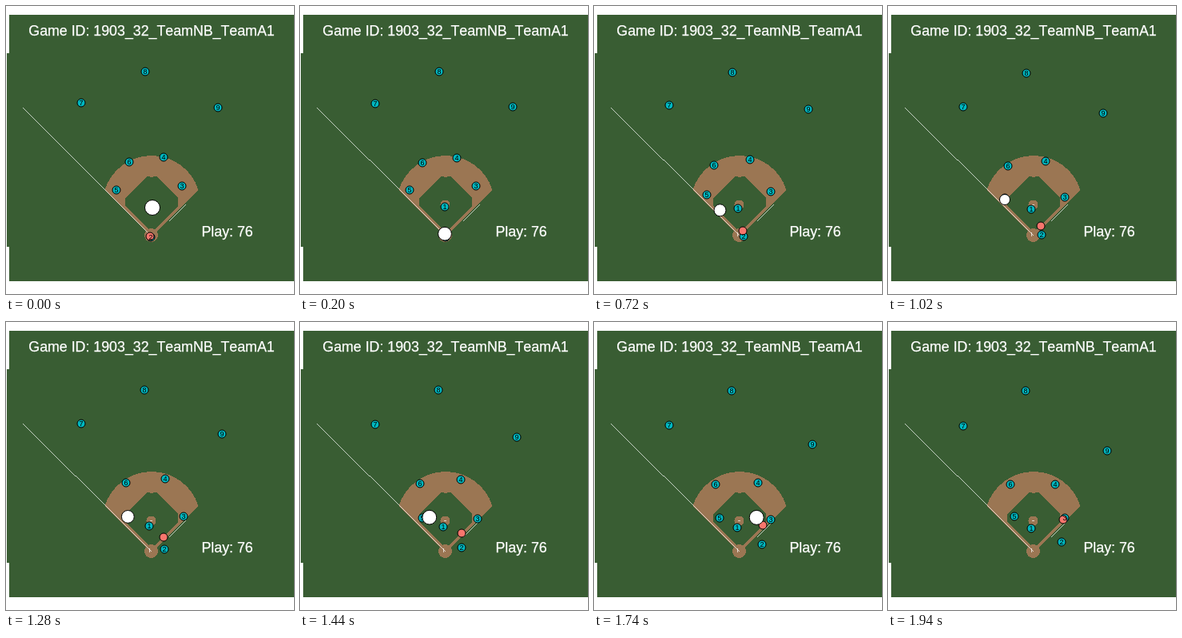
An HTML page for the animation above (1.96 s loop, 360 px wide and 360 px high).

```html
<!DOCTYPE html>
<html lang="en">
<head>
<meta charset="utf-8">
<title>Play animation</title>
<style>
  html, body { margin: 0; width: 100%; height: 100%; overflow: hidden; background: #fff; }
  svg { display: block; width: 360px; height: 360px; }
  text { font-family: "Liberation Sans", Arial, sans-serif; font-kerning: none; }
  .label { font-size: 17.8px; fill: #fff; stroke: #fff; stroke-width: .25; }
  .field { shape-rendering: crispEdges; }
  .grass { fill: #395d33; }
  .dirt { fill: #9b7653; }
  .chalk { stroke: #fff; stroke-width: .7; fill: none; }
  #dots circle, #ball { stroke: #000; stroke-width: 1; }
  #numbers text { font-size: 9px; text-anchor: middle; fill: #000; }
</style>
</head>
<body>
<svg viewBox="0 0 360 360">
  <g class="field">
    <path class="grass" d="M4 11H360V344H4V301H1V59H4Z"/>
    <path class="dirt" d="M182 288L123.500 230A61.300 61.300 0 0 1 240.500 230Z"/>
    <path class="grass" d="M176.500 212.500Q182 215 187.500 212.500L215 240V250L182 283L149 250V240Z"/>
    <circle class="dirt" cx="181.500" cy="286.500" r="8.500"/>
    <circle class="dirt" cx="181.500" cy="248.500" r="6"/>
    <path class="chalk" d="M21.500 126.500L181.500 286.500M203.500 268.500L224.500 247.500"/>
    <path class="chalk" d="M179.500 283V288M180 248.500H183"/>
  </g>
  <text class="label" x="182" y="37" text-anchor="middle">Game ID: 1903_32_TeamNB_TeamA1</text>
  <text class="label" x="244.500" y="288">Play: 76</text>
  <g id="dots"></g>
  <g id="numbers"></g>
  <circle id="ball" fill="#fff"/>
</svg>
<script>
const LOOP = 1960, STEP = 20, LAST = LOOP - STEP;

// Each run is a Bezier curve given by its control points, in position order
const fielders = [
  [[182, 250], [178, 254], [179, 258]],
  [[181, 289], [183, 291], [217, 275]],
  [[220, 225], [220, 222], [223, 255], [221, 245]],
  [[197, 189], [190, 191], [209, 203]],
  [[138, 230], [133, 228], [156, 253], [158, 243]],
  [[154, 195], [146, 201], [153, 203]],
  [[94, 121], [94, 130]],
  [[174, 82], [172, 86]],
  [[265, 127], [268, 122], [274, 161]]
].map((path, i) => makePlayer(path, "#00b8c0", i + 1));
const runner = makePlayer([[180, 288], [180.5, 284.5], [219, 247]], "#f8766d");
const players = [...fielders, runner];

// The third coordinate is the radius, which grows with height
const ballDot = document.getElementById("ball");
const pitch = [[183, 252, 9.5], [182, 286, 8]];
const hit = [[182, 286, 8], [168, 268, 14], [156, 253, 4.4], [146, 242, 6.5]];
const pickUp = [[146, 242, 6.5], [155, 244, 8.5]];
const toFirst = [[155, 244, 8.5], [187, 245, 10.5], [220, 244, 8]];
const legs = [
  { path: pitch, from: 0, to: 180 },
  { path: hit, from: 180, to: 1020 },
  { path: pickUp, from: 1020, to: 1390 },
  { path: toFirst, from: 1390, to: 1860 }
];

// De Casteljau: blend neighbouring points until one is left
function bezier(points, u) {
  while (points.length > 1) {
    points = points.slice(1).map((q, i) => q.map((c, k) => points[i][k] * (1 - u) + c * u));
  }
  return points[0];
}

function set(el, attrs) {
  for (const name in attrs) el.setAttribute(name, attrs[name]);
}

function add(parent, tag, attrs) {
  const el = document.createElementNS("http://www.w3.org/2000/svg", tag);
  set(el, attrs);
  return document.getElementById(parent).appendChild(el);
}

function makePlayer(path, fill, number) {
  const dot = add("dots", "circle", { r: 5, fill });
  const label = add("numbers", "text", {});
  label.textContent = number || "";
  return { path, dot, label };
}

function draw(now) {
  const t = Math.floor((now % LOOP) / STEP) * STEP;
  for (const { path, dot, label } of players) {
    const [x, y] = bezier(path, t / LAST).map(Math.round);
    set(dot, { cx: x, cy: y });
    set(label, { x, y: y + 3 });
  }
  const leg = legs.find(l => t < l.to);
  set(ballDot, { visibility: leg ? "visible" : "hidden" });
  if (leg) {
    const [cx, cy, r] = bezier(leg.path, (t - leg.from) / (leg.to - leg.from));
    set(ballDot, { cx, cy, r });
  }
}

const start = performance.now();
function frame() {
  draw(performance.now() - start);
  requestAnimationFrame(frame);
}
frame();
</script>
</body>
</html>
```
